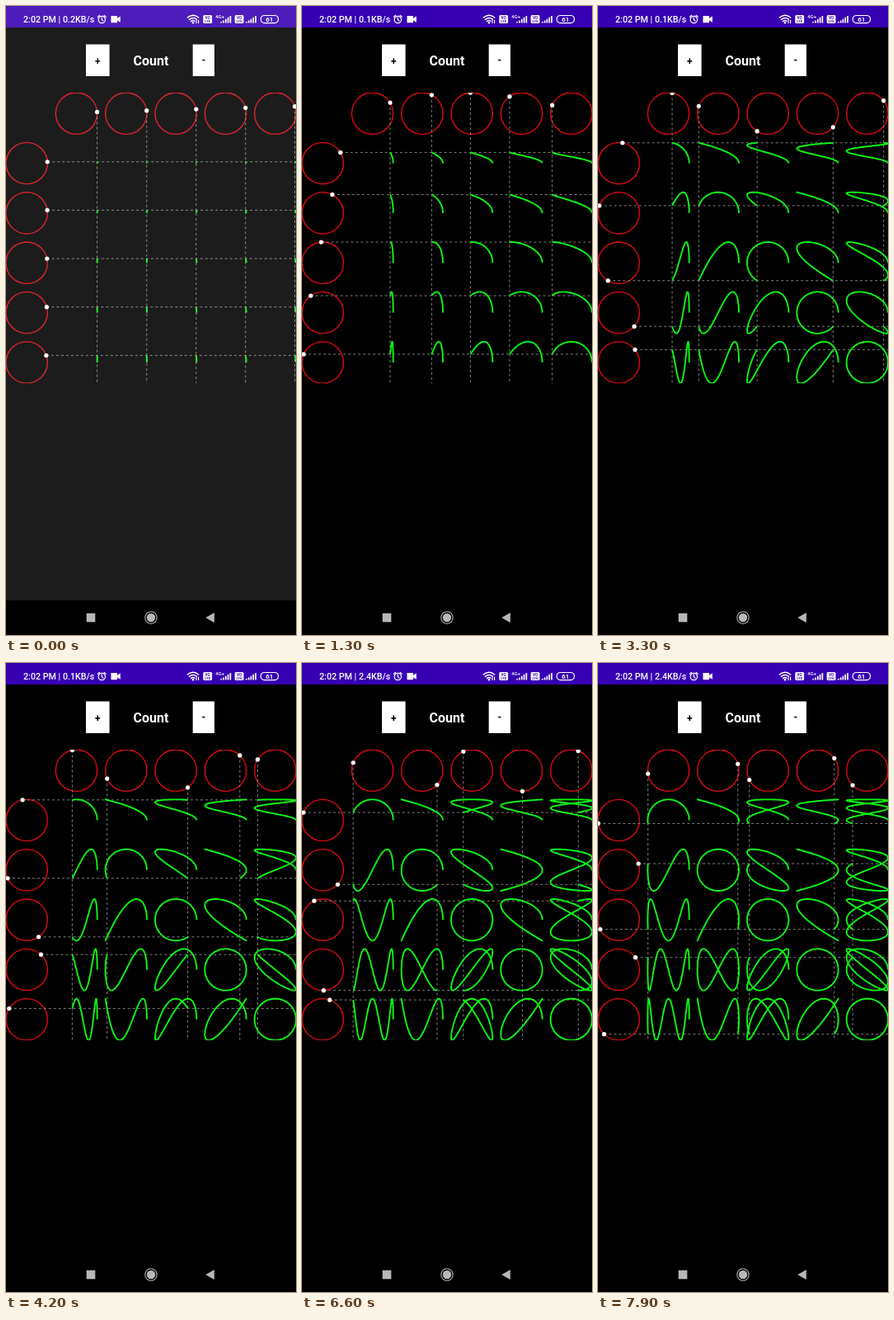
An HTML page with a canvas for the animation above (8000 ms loop, 352 by 762 pixels).

```html
<!DOCTYPE html>
<html lang="en">
<head>
<meta charset="utf-8">
<title>Curve table</title>
<style>
  html, body { margin: 0; width: 100%; height: 100%; overflow: hidden; background: #000; }
  #stage { position: relative; width: 352px; height: 762px; overflow: hidden; background: #000; }
  #stage > * { position: absolute; left: 0; top: 0; }
  #grid { top: 105px; width: 352px; height: 352px; }
  #tint { width: 352px; height: 720px; background: #fff; opacity: 0; }
  text { font-family: Roboto, sans-serif; fill: #fff; }
  .bold { font-weight: 700; text-anchor: middle; }
  .dark { fill: #000; }
  .knock { fill: #3700b3; }
  .line { fill: none; stroke: #fff; stroke-width: 1.2; stroke-linecap: round; }
  .thick { stroke-width: 1.5; }
</style>
</head>
<body>
<div id="stage">
  <svg width="352" height="762" viewBox="0 0 352 762">
    <defs>
      <g id="volte">
        <rect y="-5" width="10.8" height="10" rx="1.5" fill="#fff"/>
        <text class="bold knock" x="5.4" y="-.3" font-size="4.6">VO</text>
        <text class="bold knock" x="5.4" y="4" font-size="4.4">LTE</text>
      </g>
      <path id="bars" d="M0 4V2.6M2.8 4V1M5.6 4V-.8M8.4 4V-2.8M11.2 4V-4.6" fill="none" stroke="#fff" stroke-width="1.7"/>
    </defs>

    <rect width="352" height="26" fill="#3700b3"/>
    <g class="line">
      <circle cx="116.3" cy="16.5" r="4.2"/>
      <path d="M116.3 14V16.8L118 18M111.3 13.2L113.6 11.3M121.3 13.2L119 11.3"/>
    </g>
    <path d="M127.5 12h7.5v2.8l3.8-2.4v7.4l-3.8-2.4v2.8h-7.5z" fill="#fff"/>

    <path class="line thick" d="M220.3 14Q227 8.6 233.7 14M222.4 16.4Q227 12.8 231.4 16.2M224.5 18.6Q227 16.8 228.8 18.2"/>
    <path class="line" d="M231 20.6V17.6M233.6 17.2V20.4"/>
    <circle cx="227" cy="20.2" r="1.2" fill="#fff"/>
    <use href="#volte" x="239.3" y="16"/>
    <text x="254.3" y="14.6" font-size="6" font-weight="500">4G+</text>
    <use href="#bars" x="261.2" y="16.5"/>
    <use href="#volte" x="277.7" y="16"/>
    <use href="#bars" x="291.8" y="16.5"/>
    <rect class="line" x="309.3" y="11.5" width="21.2" height="9.2" rx="4.4"/>
    <text class="bold" x="319.8" y="18.9" font-size="7.8">61</text>
    <text id="status" x="21" y="20" font-size="10.7" font-weight="500"></text>

    <rect x="97" y="46.5" width="28.6" height="38.5" fill="#fff"/>
    <rect x="226.7" y="46.5" width="26.3" height="38.5" fill="#fff"/>
    <text class="bold dark" x="111.2" y="70.5" font-size="12">+</text>
    <text class="bold dark" x="239.8" y="70" font-size="12">-</text>
    <text class="bold" x="176" y="72" font-size="16">Count</text>

    <g fill="#b8b8b8">
      <rect x="97.7" y="735.7" width="10.6" height="10.6"/>
      <circle cx="176" cy="741" r="5.2"/>
      <circle cx="176" cy="741" r="7.2" fill="none" stroke="#b8b8b8" stroke-width="1.1"/>
      <path d="M242.3 741L252.8 735V747z"/>
    </g>
  </svg>
  <canvas id="grid"></canvas>
  <div id="tint"></div>
</div>

<script>
const LOOP = 8000, STEP = 100;
const SIZE = 352, COUNT = 5, GAP = 10;
const DIAMETER = (SIZE - COUNT * GAP) / (COUNT + 1);
const R = DIAMETER / 2;
const center = k => R + k * (DIAMETER + GAP);

// [time in ms, base angle in radians]
const ANGLES = [[0, .069], [1300, .547], [2500, 1.048], [4200, 1.774],
                [5400, 2.259], [6600, 2.759], [7900, 3.299]];

const grid = document.getElementById('grid');
const status = document.getElementById('status');
const tint = document.getElementById('tint');
const ctx = grid.getContext('2d');
const dpr = window.devicePixelRatio || 1;
grid.width = grid.height = Math.round(SIZE * dpr);
ctx.scale(dpr, dpr);
ctx.lineJoin = 'round';

function angleAt(t) {
  let i = 1;
  while (i < ANGLES.length - 1 && t > ANGLES[i][0]) i++;
  const [t0, a0] = ANGLES[i - 1], [t1, a1] = ANGLES[i];
  return a0 + (a1 - a0) * (t - t0) / (t1 - t0);
}

const posX = (k, c, a) => c + R * Math.cos(k * a);
const posY = (k, c, a) => c - R * Math.sin(k * a);

function stroke(color, width, dash = []) {
  ctx.strokeStyle = color;
  ctx.lineWidth = width;
  ctx.setLineDash(dash);
  ctx.stroke();
}

function disc(x, y, r) {
  ctx.beginPath();
  ctx.arc(x, y, r, 0, 2 * Math.PI);
}

function guide(x1, y1, x2, y2) {
  ctx.beginPath();
  ctx.moveTo(x1, y1);
  ctx.lineTo(x2, y2);
  stroke('#808080', 1, [3, 3]);
}

function curve(col, row, angle) {
  const steps = Math.ceil(angle / .0175);
  ctx.beginPath();
  for (let i = 0; i <= steps; i++) {
    const a = angle * i / steps;
    ctx.lineTo(posX(col, center(col), a), posY(row, center(row), a));
  }
  stroke('#0cf814', 1.9);
}

// One driver circle with its dashed guide and white dot
function driver(k, cx, cy, angle, vertical) {
  const x = posX(k, cx, angle), y = posY(k, cy, angle);
  disc(cx, cy, R);
  stroke('#e00a14', 1.4);
  guide(x, y, vertical ? x : SIZE, vertical ? SIZE : y);
  disc(x, y, 2.6);
  ctx.fillStyle = '#fff';
  ctx.fill();
}

function draw(t) {
  const angle = angleAt(t);
  ctx.clearRect(0, 0, SIZE, SIZE);
  for (let k = 1; k <= COUNT; k++) {
    driver(k, center(k), R, angle, true);
    driver(k, R, center(k), angle, false);
  }
  for (let row = 1; row <= COUNT; row++)
    for (let col = 1; col <= COUNT; col++) curve(col, row, angle);

  const rate = t < 800 ? '0.2' : t < 4800 ? '0.1' : '2.4';
  status.textContent = `2:02 PM | ${rate}KB/s`;
  tint.style.opacity = Math.max(0, .11 * (1 - t / 300));
}

function tick() {
  const t = performance.now() % LOOP;
  draw(Math.floor(t / STEP) * STEP);
  requestAnimationFrame(tick);
}
tick();
</script>
</body>
</html>
```
